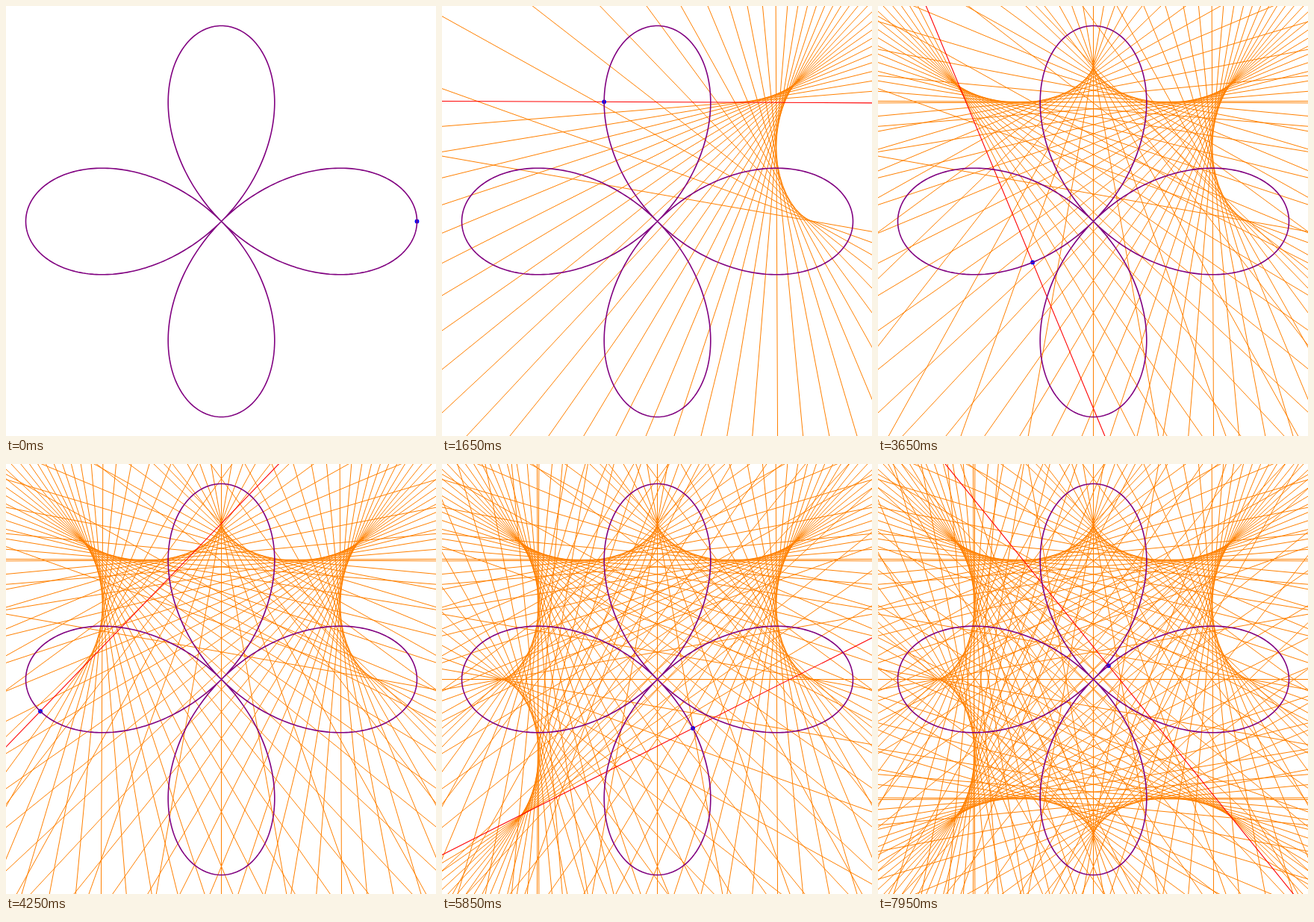
An HTML page for the animation above (8000 ms loop, 576 px wide and 576 px high).

```html
<!DOCTYPE html>
<html lang="en">
<head>
<meta charset="utf-8">
<title>Normals of a four-leaved rose</title>
<style>
  html, body { margin: 0; width: 100%; height: 100%; overflow: hidden; background: #fff; }
  svg { display: block; width: 100vw; height: 100vh; }
</style>
</head>
<body>
<svg id="stage" viewBox="0 0 576 576">
  <g id="trail" stroke="#ff8000" stroke-width="1"></g>
  <line id="normal" stroke="#ff0000" stroke-width="1.1"/>
  <circle id="dot" r="2.9" fill="#0000ff"/>
  <path id="rose" fill="none" stroke="#800080" stroke-width="1.6" stroke-linejoin="round"/>
</svg>
<script>
const CENTER = 288.5, RADIUS = 262, REACH = 1000;
const STEP_MS = 50, STEPS = 160, STEP_ANGLE = Math.PI / 90;
const $ = id => document.getElementById(id);

function setAttrs(el, attrs) {
  for (const name in attrs) el.setAttribute(name, attrs[name]);
}

function rosePoint(a) {
  const r = RADIUS * Math.cos(2 * a);
  return { x: CENTER + r * Math.cos(a), y: CENTER + r * Math.sin(a) };
}

// Ends of a long segment perpendicular to the rose at angle a
function normalAt(a) {
  const r = Math.cos(2 * a), dr = -2 * Math.sin(2 * a);
  const tx = dr * Math.cos(a) - r * Math.sin(a);
  const ty = dr * Math.sin(a) + r * Math.cos(a);
  const k = REACH / Math.hypot(tx, ty);
  const { x, y } = rosePoint(a);
  return { x1: x - ty * k, y1: y + tx * k, x2: x + ty * k, y2: y - tx * k };
}

let outline = "";
for (let i = 0; i < 720; i++) {
  const p = rosePoint(i * Math.PI / 360);
  outline += (i ? "L" : "M") + p.x.toFixed(2) + " " + p.y.toFixed(2);
}
$("rose").setAttribute("d", outline + "Z");

const trail = [];
for (let i = 1; i < STEPS; i++) {
  const line = document.createElementNS($("stage").namespaceURI, "line");
  setAttrs(line, normalAt(i * STEP_ANGLE));
  trail.push($("trail").appendChild(line));
}

let shown = -1;
function draw(ms) {
  const step = Math.floor(ms / STEP_MS) % STEPS;
  if (step === shown) return;
  shown = step;
  const a = step * STEP_ANGLE, p = rosePoint(a);
  trail.forEach((line, i) => line.setAttribute("visibility", i + 1 < step ? "visible" : "hidden"));
  setAttrs($("normal"), { ...normalAt(a), visibility: step ? "visible" : "hidden" });
  setAttrs($("dot"), { cx: p.x, cy: p.y });
}

function tick() {
  draw(performance.now());
  requestAnimationFrame(tick);
}
tick();
</script>
</body>
</html>
```
